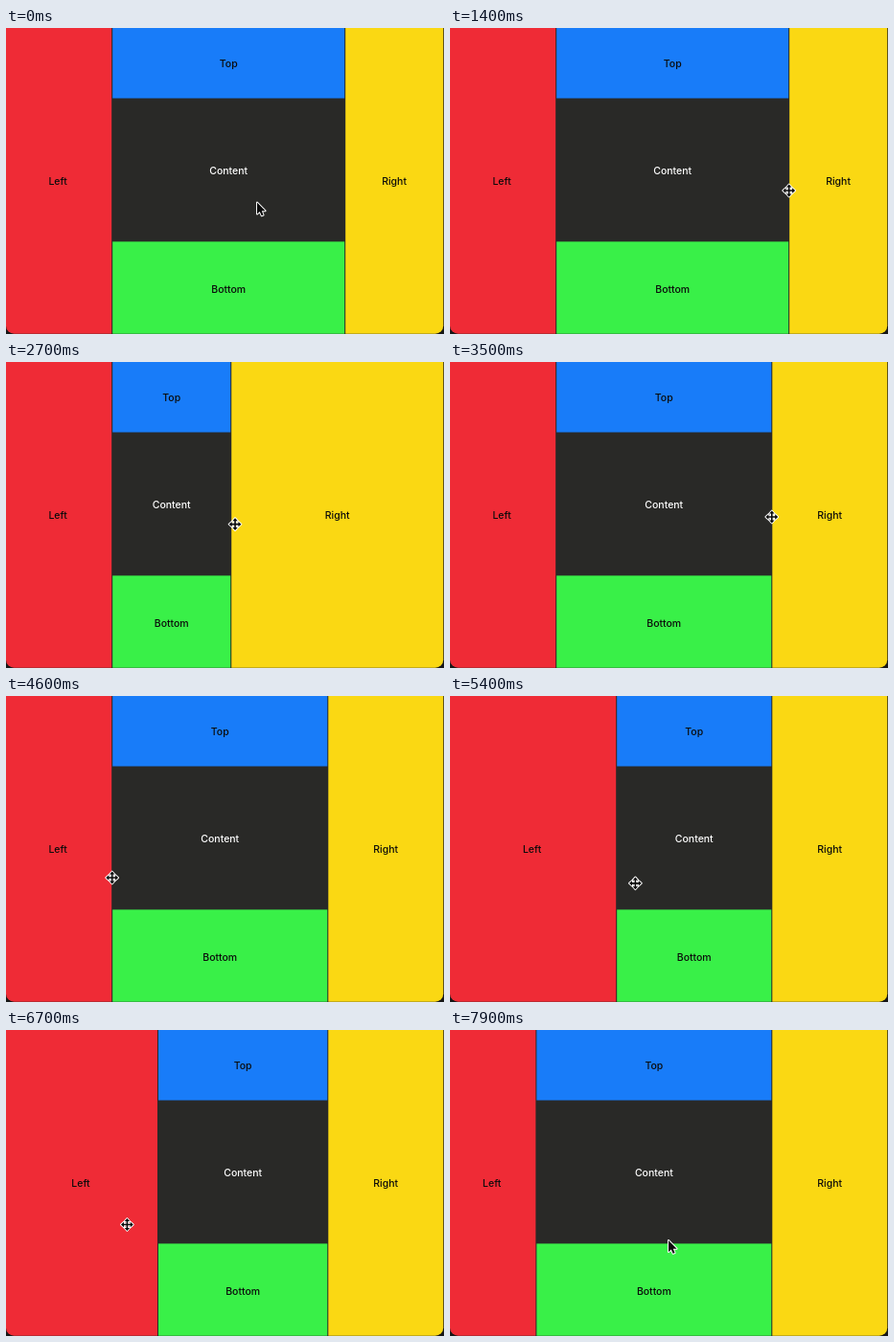
An HTML page that plays this animation: 457x320 px, repeating every 8 s.

```html
<!DOCTYPE html>
<html lang="en">
<head>
<meta charset="utf-8">
<title>Resizable panels</title>
<style>
  html, body { margin: 0; width: 100%; height: 100%; overflow: hidden; background: #161616; }
  svg { position: absolute; left: 0; top: 0; width: 457px; height: 320px; }
  text { font: 500 10.5px Inter, "Liberation Sans", sans-serif; text-anchor: middle; fill: #0b0b0b; }
  .light { fill: #fff; }
  path { fill: #0a0a0a; stroke: #fff; stroke-width: 1.9; stroke-linejoin: round; paint-order: stroke; }
</style>
</head>
<body>
<svg viewBox="0 0 457 320">
  <clipPath id="window"><rect y="-20" width="456.3" height="339.8" rx="8.5"/></clipPath>
  <g clip-path="url(#window)">
    <rect width="457" height="320" fill="#292927"/>
    <rect class="mid" height="73.5" fill="#187cf9"/>
    <rect class="mid" y="223.4" height="97" fill="#39f048"/>
    <rect id="left" height="320" fill="#ef2b36"/>
    <rect id="right" height="320" fill="#fad813"/>
    <text id="leftLabel" y="164">Left</text>
    <text class="label" y="41">Top</text>
    <text class="label light" y="153.2">Content</text>
    <text class="label" y="276.5">Bottom</text>
    <text id="rightLabel" y="164">Right</text>
  </g>
  <g id="cursor">
    <path id="arrow" d="M0 .5V12.6L2.8 10 4.7 14.3 6.6 13.5 4.8 9.2H8.6Z"/>
    <path id="resize" d="M.5-6.4 3.2-3.4H1.3V-.8H3.9V-2.7L6.9 0 3.9 2.7V.8H1.3V3.4H3.2L.5 6.4-2.2 3.4H-.3V.8H-2.9V2.7L-5.9 0-2.9-2.7V-.8H-.3V-3.4H-2.2Z"/>
  </g>
</svg>
<script>
  const LOOP = 8000, TICK = 100, LAG = 90, WIDTH = 456;
  const start = { x: 262, y: 182, left: 110.2, right: 353.2 };

  // Pointer moves; those with an edge drag that divider along
  const moves = [
    { from: 0, to: 700, x: 336, y: 173 },
    { from: 800, to: 1400, x: 353.2, y: 170 },
    { from: 1500, to: 2500, x: 234.2, y: 170, edge: "right" },
    { from: 2600, to: 3400, x: 335.3, y: 162, edge: "right" },
    { from: 3600, to: 4400, x: 110.2, y: 190 },
    { from: 4840, to: 5950, x: 273.4, y: 201.5, edge: "left" },
    { from: 6200, to: 6900, x: 89.4, y: 204, edge: "left" },
    { from: 7200, to: 7900, x: 228, y: 219.5 }
  ];

  const $ = id => document.getElementById(id);
  const set = (el, attrs) => Object.entries(attrs).forEach(([k, v]) => el.setAttribute(k, v));
  const setAll = (css, attrs) => document.querySelectorAll(css).forEach(el => set(el, attrs));

  function ease(t, { from, to }) {
    const p = Math.min(1, Math.max(0, (t - from) / (to - from)));
    return p * p * (3 - 2 * p);
  }

  const follow = (t, list, key, value) =>
    list.reduce((v, m) => v + (m[key] - v) * ease(t, m), value);

  // Dividers trail the pointer slightly
  const divider = (t, edge) =>
    follow(t - LAG, moves.filter(m => m.edge === edge), "x", start[edge]);

  function draw(now) {
    const t = Math.floor(now % LOOP / TICK) * TICK;
    const x = follow(t, moves, "x", start.x), y = follow(t, moves, "y", start.y);
    const left = divider(t, "left"), right = divider(t, "right");

    set($("left"), { width: left });
    set($("right"), { x: right + 1, width: WIDTH - right });
    setAll(".mid", { x: left + 1, width: right - left - 1 });
    set($("leftLabel"), { x: left / 2 - 1 });
    set($("rightLabel"), { x: (right + 1 + WIDTH) / 2 });
    setAll(".label", { x: (left + right + 1) / 2 });

    const dragging = moves.some(m => m.edge && t >= m.from && t <= m.to + TICK);
    const near = Math.min(Math.abs(x - left), Math.abs(x - right)) < 4;
    const resizing = dragging || near;
    $("arrow").style.display = resizing ? "none" : "";
    $("resize").style.display = resizing ? "" : "none";
    set($("cursor"), { transform: `translate(${x} ${y})` });
  }

  const began = performance.now();
  function frame() {
    draw(performance.now() - began);
    requestAnimationFrame(frame);
  }
  frame();
</script>
</body>
</html>
```
